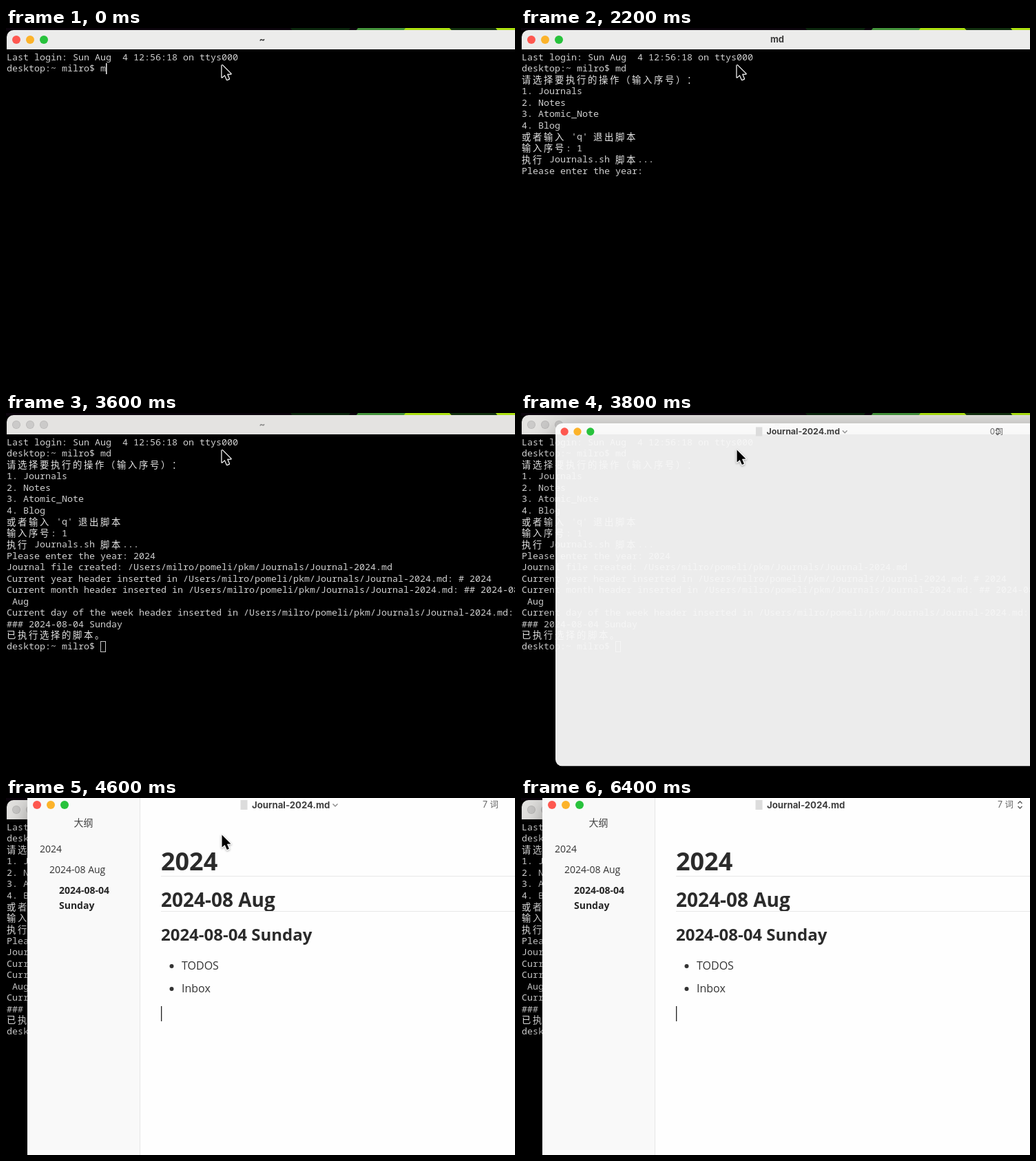
Animation, 739 px wide and 518 px high, one loop 6600 ms. Source, as an HTML page with a canvas:

```html
<!DOCTYPE html>
<html lang="zh-CN">
<head>
<meta charset="utf-8">
<title>Journal script</title>
<style>
html, body { margin: 0; width: 100%; height: 100%; overflow: hidden; background: #000; }
canvas { display: block; }
</style>
</head>
<body>
<canvas id="stage" width="739" height="518"></canvas>
<script>
const W = 739, H = 518, LOOP = 6600, STEP = 200;
const ctx = document.getElementById('stage').getContext('2d');

const CELL = 8, ROW = 16.47, LEFT = 1, FIRST = 42.5;
const MONO = '300 13.33px "Noto Sans Mono", monospace';
const CJK = '"Noto Sans CJK SC", "Noto Sans CJK", sans-serif';
const UI = 'Inter, "Noto Sans CJK SC", sans-serif';
const DOC = '"Open Sans", "Noto Sans CJK SC", sans-serif';
const LIGHTS = ['#fe5850', '#fcb32a', '#28c23c'];

const FILE = '/Users/milro/pomeli/pkm/Journals/Journal-2024.md';
const PROMPT = 'desktop:~ milro$ ';
const MENU = [
  '请选择要执行的操作（输入序号）：',
  '1. Journals', '2. Notes', '3. Atomic_Note', '4. Blog',
  "或者输入 'q' 退出脚本"
];
const RESULT = [
  'Journal file created: ' + FILE,
  `Current year header inserted in ${FILE}: # 2024`,
  `Current month header inserted in ${FILE}: ## 2024-08`,
  ' Aug',
  `Current day of the week header inserted in ${FILE}: `,
  '### 2024-08-04 Sunday',
  '已执行选择的脚本。',
  PROMPT
];

const within = (t, a, b) => t >= a && t < b;

function text(str, x, y, font, color, align = 'left') {
  ctx.font = font;
  ctx.fillStyle = color;
  ctx.textAlign = align;
  ctx.fillText(str, x, y);
}

function poly(points, color) {
  ctx.fillStyle = color;
  ctx.beginPath();
  points.forEach(([x, y]) => ctx.lineTo(x, y));
  ctx.closePath();
  ctx.fill();
}

function stroke(points, color, width) {
  ctx.strokeStyle = color;
  ctx.lineWidth = width;
  ctx.beginPath();
  points.forEach(([x, y]) => ctx.lineTo(x, y));
  ctx.stroke();
}

function disc(x, y, r, color) {
  ctx.fillStyle = color;
  ctx.beginPath();
  ctx.arc(x, y, r, 0, Math.PI * 2);
  ctx.fill();
}

function rect(x, y, w, h, color) {
  ctx.fillStyle = color;
  ctx.fillRect(x, y, w, h);
}

function panel(x, y, w, h, radii, color) {
  ctx.fillStyle = color;
  ctx.beginPath();
  ctx.roundRect(x, y, w, h, radii);
  ctx.fill();
}

function desktop() {
  rect(0, 0, W, H, '#000');
  rect(0, 0, W, 4, '#0b040c');
  poly([[413, 0], [500, 0], [497, 4], [416, 4]], '#0b260d');
  poly([[511, 0], [582, 0], [579, 4], [508, 4]], '#43923a');
  poly([[580, 0], [644, 0], [648, 4], [577, 4]], '#aade10');
  poly([[644, 0], [712, 0], [715, 4], [648, 4]], '#12300f');
  poly([[711, 0], [739, 0], [739, 4], [714, 4]], '#aade10');
}

// Wide characters take two cells of the terminal grid.
function cells(line, row) {
  const y = FIRST + row * ROW + 4.5;
  let col = 0;
  for (const ch of line) {
    const wide = ch.charCodeAt(0) > 0x2e7f;
    const x = LEFT + col * CELL;
    if (wide) text(ch, x, y + .5, '13.33px ' + CJK, '#e6e6e6');
    else if (ch !== ' ') text(ch, x, y, MONO, '#cfcfcf');
    col += wide ? 2 : 1;
  }
  return col;
}

function terminalLines(t) {
  const lines = ['Last login: Sun Aug  4 12:56:18 on ttys000'];
  lines.push(PROMPT + (t < 200 ? 'm' : 'md'));
  if (t >= 600) lines.push(...MENU, '输入序号: ' + (t < 1600 ? '' : '1'));
  if (t >= 1800) lines.push('执行 Journals.sh 脚本...');
  if (t >= 2000) {
    const typed = Math.max(0, Math.floor((t - 2200) / STEP));
    lines.push('Please enter the year: ' + '2024'.slice(0, typed));
  }
  if (t >= 3200) lines.push(...RESULT);
  return lines;
}

function terminal(t) {
  const active = t < 3600;
  panel(1, 3, W + 20, 28, [10, 0, 0, 0], active ? '#ececeb' : '#e4e3e1');
  rect(1, 31, W, H, '#000');
  LIGHTS.forEach((color, i) => {
    const x = 15 + i * 20;
    if (active) return disc(x, 17, 6, color);
    disc(x, 17, 6, '#b9b8b7');
    disc(x, 17, 5.2, '#cbcac9');
  });
  const title = within(t, 800, 3200) ? 'md' : '~';
  text(title, 372, 21, 'bold 13px ' + UI, active ? '#3c3c3c' : '#8c8c8c', 'center');

  const lines = terminalLines(t);
  let col = 0;
  lines.forEach((line, row) => { col = cells(line, row); });
  const x = LEFT + col * CELL;
  const y = Math.round(FIRST + (lines.length - 1) * ROW - 8);
  if (!active) {
    ctx.strokeStyle = '#c8c8c8';
    ctx.lineWidth = 1;
    ctx.strokeRect(x + .5, y + .5, 7, 15);
  } else if (!within(t, 1000, 1200) && !within(t, 2200, 2400)) {
    rect(x, y, 1.5, 16, '#f0f0f0');
  }
}

function sidebar() {
  rect(31, 0, 163, H, '#f9f9f9');
  rect(194, 0, 1, H, '#e6e6e6');
  text('大纲', 112.5, 41, '14px ' + CJK, '#444', 'center');
  text('2024', 49, 79, '14px ' + DOC, '#333');
  text('2024-08 Aug', 63, 109, '14px ' + DOC, '#333');
  text('2024-08-04', 77, 139, 'bold 14px ' + DOC, '#262626');
  text('Sunday', 77, 161, 'bold 14px ' + DOC, '#262626');
}

function page(t) {
  text('2024', 225, 105, 'bold 36px ' + DOC, '#2b2b2b');
  rect(225, 113, W, 1, '#e8e8e8');
  text('2024-08 Aug', 225, 158, 'bold 28px ' + DOC, '#2b2b2b');
  rect(225, 164, W, 1, '#e8e8e8');
  text('2024-08-04 Sunday', 225, 207, 'bold 24px ' + DOC, '#2b2b2b');
  ['TODOS', 'Inbox'].forEach((item, i) => {
    const y = 249 + i * 33;
    disc(240.5, y - 5, 3, '#333');
    text(item, 255, y, '16px ' + DOC, '#333');
  });
  const off = within(t, 5000, 5400) || within(t, 6000, 6400);
  if (!off) rect(225, 302, 1.3, 22, '#222');
}

function sorter(x) {
  stroke([[x - 3, 8], [x, 5], [x + 3, 8]], '#555', 1.3);
  stroke([[x - 3, 12], [x, 15], [x + 3, 12]], '#555', 1.3);
}

function editor(t) {
  const opening = t < 4000;
  const loaded = t >= 4400;
  ctx.save();
  if (opening) {
    ctx.translate(50, 17.6);
    ctx.scale(.94, .94);
    ctx.translate(-31, 0);
  }
  ctx.save();
  ctx.shadowColor = 'rgba(0,0,0,.4)';
  ctx.shadowBlur = 34;
  ctx.shadowOffsetY = 8;
  panel(31, -2.8, W + 40, 529, 10, opening ? 'rgba(254,254,254,.93)' : '#fefefe');
  ctx.restore();

  if (t >= 4200) sidebar();
  if (loaded) page(t);

  LIGHTS.forEach((color, i) => disc(45 + i * 20, 10, 6, color));
  rect(340.5, 3, 10, 14, '#dcdcdc');
  text('Journal-2024.md', 357, 14.5, 'bold 13.2px ' + UI, '#3f3f3f');
  if (t < 5600) stroke([[474.5, 8.5], [478, 12], [481.5, 8.5]], '#8a8a8a', 1.4);
  text(loaded ? '7 词' : '0词', loaded ? 692 : 702, 14.3, '12.5px ' + UI, '#666');
  if (!loaded) sorter(714);
  if (t >= 5600) sorter(724.5);
  ctx.restore();
}

function pointer() {
  const tip = [[0, 0], [0, 18], [4.2, 14.4], [7.3, 21.6], [10.4, 20.3], [7.4, 13.2], [13, 13]]
    .map(([x, y]) => [x + 313.5, y + 53.5]);
  ctx.save();
  ctx.lineJoin = 'round';
  ctx.shadowColor = 'rgba(0,0,0,.35)';
  ctx.shadowBlur = 3;
  ctx.shadowOffsetY = 1;
  stroke([...tip, tip[0]], '#fff', 2.4);
  ctx.restore();
  poly(tip, '#000');
}

function draw(t) {
  desktop();
  terminal(t);
  if (t >= 3800) editor(t);
  if (t < 5800) pointer();
}

const start = performance.now();
function tick() {
  const t = (performance.now() - start) % LOOP;
  draw(Math.floor(t / STEP) * STEP);
  requestAnimationFrame(tick);
}
tick();
</script>
</body>
</html>
```
